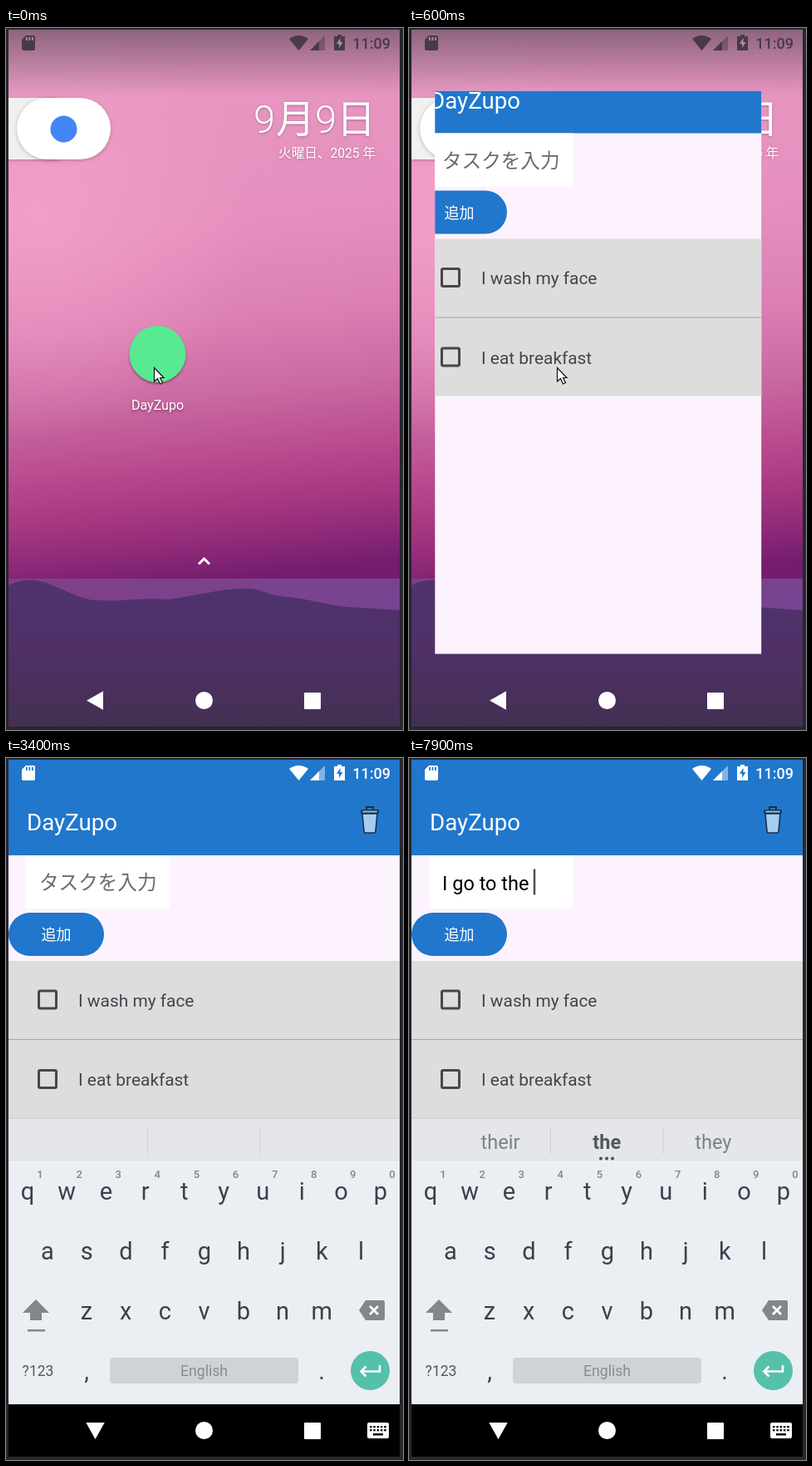
An HTML page with a canvas for the animation above (8 s loop, 478 by 844 pixels).

```html
<!DOCTYPE html>
<html lang="ja">
<meta charset="utf-8">
<style>
html, body { margin: 0; width: 478px; height: 844px; overflow: hidden; background: #28272e }
canvas { display: block }
</style>
<canvas id="stage" width="478" height="844"></canvas>
<script>
const c = document.getElementById('stage').getContext('2d');
const LOOP = 8000, APP = 'DayZupo';
const SANS = 'Roboto, "Noto Sans CJK JP", "Noto Sans CJK", sans-serif';
const BLUE = '#2177cc', WHITE = '#fff';

// time, text, suggestions, blink origin
const typing = [
  [0, '', [], 800],
  [4700, 'I', [], 4200],
  [5200, 'I ', []],
  [5600, 'I g', ['get', 'g', 'go']],
  [5900, 'I go', ['good', 'go', 'got']],
  [6100, 'I go ', ['good', 'go', 'got']],
  [6400, 'I go t', ['the', 't', 'to']],
  [6500, 'I go to', ['go', 'to', 'two']],
  [6700, 'I go to ', ['go', 'to', 'two']],
  [7100, 'I go to t', ['the', 't', 'to']],
  [7300, 'I go to th', ['this', 'th', 'the']],
  [7500, 'I go to the', ['their', 'the', 'they']],
  [7700, 'I go to the ', ['their', 'the', 'they']]
];

const clamp = v => Math.max(0, Math.min(1, v));
const mix = (a, b, p) => a + (b - a) * p;

function box(x, y, w, h, fill, r = 0) {
  c.fillStyle = fill;
  c.beginPath();
  c.roundRect(x, y, w, h, r);
  c.fill();
}
function disc(x, y, r, fill) {
  c.fillStyle = fill;
  c.beginPath();
  c.arc(x, y, r, 0, 7);
  c.fill();
}
function shape(path, fill, stroke, width = 1) {
  const p = new Path2D(path);
  if (fill) { c.fillStyle = fill; c.fill(p); }
  if (stroke) { c.strokeStyle = stroke; c.lineWidth = width; c.stroke(p); }
}
function text(s, x, y, size, fill, align = 'left', weight = 400) {
  c.font = `${weight} ${size}px ${SANS}`;
  c.textAlign = align;
  c.fillStyle = fill;
  c.fillText(s, x, y);
}
function gradient(x0, y0, x1, y1, ...stops) {
  const g = c.createLinearGradient(x0, y0, x1, y1);
  stops.forEach(([p, color]) => g.addColorStop(p, color));
  return g;
}
function shadow(blur, y, color = 'rgba(0,0,0,.35)') {
  c.shadowBlur = blur;
  c.shadowOffsetY = y;
  c.shadowColor = color;
}
const noShadow = () => shadow(0, 0, 'transparent');

function statusBar(dark) {
  const ink = dark ? '#493a47' : WHITE;
  const hole = dark ? '#b58aa5' : BLUE;
  shape('M24 9H33Q35 9 35 11V25Q35 27 33 27H21Q19 27 19 25V14Z', ink);
  for (const x of [24, 27.5, 31]) box(x, 11, 1.8, 4, hole);
  shape('M341 13Q352.500 5 364 13L352.500 27Z', ink);
  c.globalAlpha *= .45;
  shape('M384 9V27H366Z', ink);
  c.globalAlpha /= .45;
  shape('M377 16V27H366Z', ink);
  shape('M399 8H404V10H408V27H395V10H399Z', ink);
  shape('M402.500 12L398 19H401V24L405.500 17H402.500Z', hole);
  text('11:09', 463, 25, 18, ink, 'right', 500);
}

function navButtons(back) {
  shape(back ? 'M99 808.500L116 799V818Z' : 'M98 800H117L107.500 817Z', WHITE, WHITE, 2);
  disc(238.5, 808.5, 10.5, WHITE);
  box(359, 799, 20, 20, WHITE, 1);
}

function home() {
  box(3, 2, 471, 660, gradient(190, 0, 260, 662,
    [0, '#dd96ba'], [.12, '#e796c1'], [.36, '#e68fbe'], [.53, '#dc80b3'],
    [.66, '#cb6ba3'], [.77, '#bb4f91'], [.86, '#a93a82'], [.93, '#922b79'], [1, '#741d6f']));
  const glow = c.createRadialGradient(40, 230, 10, 40, 230, 260);
  glow.addColorStop(0, 'rgba(247,165,205,.65)');
  glow.addColorStop(1, 'rgba(247,165,205,0)');
  box(3, 2, 471, 560, glow);
  box(3, 2, 471, 80, gradient(0, 2, 0, 82, [0, 'rgba(60,50,65,.5)'], [1, 'rgba(60,50,65,0)']));
  box(3, 662, 471, 178, gradient(3, 0, 474, 0, [0, '#804087'], [1, '#774491']));
  shape('M3 670Q22 660 45 666C70 674 90 688 110 688C140 690 155 685 195 687C235 682 255 674 290 674' +
    'C310 674 315 683 340 684C370 687 390 696 430 697L474 700V840H3Z',
    gradient(0, 664, 0, 840, [0, '#50336e'], [.5, '#4e3066'], [1, '#443052']));

  shadow(4, 1, 'rgba(0,0,0,.25)');
  box(3, 84, 60, 74, '#f0f0f1');
  box(13, 84, 113, 74, WHITE, 37);
  noShadow();
  disc(69.5, 121.5, 16, '#4285f4');

  shadow(3, 1, 'rgba(0,0,0,.25)');
  text('9', 298, 126, 47, WHITE, 'left', 300);
  text('月', 325, 126, 47, WHITE);
  text('9', 372, 126, 47, WHITE, 'left', 300);
  text('日', 398, 126, 47, WHITE);
  text('火曜日、2025 年', 445, 156, 15.6, WHITE, 'right');
  shadow(3, 2);
  disc(182.5, 392, 34, '#57ea92');
  text(APP, 182.5, 459, 16, WHITE, 'center');
  noShadow();
  shape('M232 644.500L238.500 638L245 644.500', null, WHITE, 3);
  navButtons(true);
}

function trash() {
  const line = '#17304d';
  shape('M429 67L431 88Q431 90 433 90H443Q445 90 445 88L447 67Z', '#a5cdf0', line, 1.6);
  shape('M434 62V59H442V62', null, line, 2);
  box(427, 62, 22, 5, line, 2);
  box(429, 63.5, 18, 2, '#8dbbe4', 1);
}

function app(t, state) {
  const [start, typed, , origin = start] = state;
  box(3, 0, 471, 840, '#fdf3ff');
  box(3, 0, 471, 117, BLUE);
  text(APP, 25, 87, 27.7, WHITE);
  trash();
  box(24, 117, 173, 64, WHITE);
  if (typed) text(typed, 40, 159, 23.5, '#000');
  else text('タスクを入力', 40, 158, 23.6, '#6b6b6b');
  if ((t - origin + LOOP) % 1000 < 500) {
    c.font = `23.5px ${SANS}`;
    box(39.5 + c.measureText(typed).width, 133.5, 2.5, 31, '#55495a');
  }
  box(3, 186, 115, 52, BLUE, 26);
  text('追加', 60.5, 219, 18, WHITE, 'center');

  box(3, 244, 471, 189, '#dddddd');
  box(3, 338, 471, 1, '#a5a5a5');
  ['I wash my face', 'I eat breakfast'].forEach((item, i) => {
    const y = i * 95.5;
    c.strokeStyle = '#49454f';
    c.lineWidth = 3;
    c.beginPath();
    c.roundRect(39.5, 280 + y, 21, 21, 1.5);
    c.stroke();
    text(item, 87, 298.5 + y, 20.9, '#47434d');
  });
  c.globalAlpha *= 1 - clamp((t - 2000) / 250);
  box(469, 244, 5, 126, '#959595');
  c.globalAlpha = 1;
  box(3, 777, 471, 63, '#000');
}

function keyRow(letters, x, y) {
  [...letters].forEach((k, i) => text(k, x + i * 47.2, y, 29, '#37434b', 'center'));
}

function keyboard(words) {
  const grey = '#7f888c';
  box(3, 432, 471, 2, '#d2d3d7');
  box(3, 434, 471, 51, '#e4e6ea');
  box(3, 485, 471, 292, '#ebeef2');
  box(3, 485, 471, 1, '#f5f7f9');
  for (const x of [170, 305.5]) box(x, 444, 1, 32, '#cdd0d4');
  words.forEach((w, i) => {
    const mid = i === 1;
    text(w, 110 + i * 128.2, 469.5, 23.5, mid ? '#50585e' : '#7b8287', 'center', mid ? 700 : 400);
    if (mid) for (const dx of [-7, 0, 7]) disc(238 + dx, 481.5, 2, '#454d53');
  });
  keyRow('qwertyuiop', 26, 531);
  [...'1234567890'].forEach((n, i) => text(n, 41 + i * 47.1, 505, 13, '#7d868b', 'center', 500));
  keyRow('asdfghjkl', 50, 603);
  keyRow('zxcvbnm', 97, 675);
  shape('M36 651L52 667H43V676H29V667H20Z', grey);
  box(26, 687, 21, 2.5, grey);
  shape('M433 652H454Q456 652 456 654V674Q456 676 454 676H433L425 664Z', grey);
  shape('M438 659L448 669M448 659L438 669', null, WHITE, 2.8);
  text('?123', 38.5, 743, 17.5, '#4f5a61', 'center');
  text(',', 97, 747, 29, '#37434b', 'center');
  text('.', 380, 747, 29, '#37434b', 'center');
  box(125, 721, 227, 31, '#cfd3d8', 4);
  text('English', 238.5, 742.5, 17.7, '#868d92', 'center');
  disc(438.5, 736.5, 23.5, '#55c1ab');
  shape('M450 730V737.500H428M433.500 731.500L427.500 737.500L433.500 743.500', null, WHITE, 2.6);
}

function keyboardIcon() {
  box(435, 799, 26, 19, WHITE, 2);
  for (let i = 0; i < 10; i++) box(438 + i % 5 * 4.3, 803 + (i > 4) * 4, 2.5, 2.3, '#000');
  box(442, 812, 12, 2.5, '#000');
}

function draw(t) {
  const state = typing.findLast(s => s[0] <= t);
  const open = clamp((t - 400) / 336);
  box(0, 0, 478, 844, '#28272e');
  c.save();
  c.beginPath();
  c.rect(3, 2, 471, 838);
  c.clip();
  if (open < 1) home();
  if (open > 0) {
    // the window widens quickly from the icon, then grows in height
    const wide = 1 - (1 - open) ** 1.8;
    const rise = open ** 3.3, tall = rise / (rise + (1 - open) ** 3.3);
    const left = mix(149, 3, wide), top = mix(358, 0, tall);
    c.save();
    c.beginPath();
    c.rect(left, top, mix(217, 474, wide) - left, mix(427, 840, tall) - top);
    c.clip();
    c.globalAlpha = clamp(open * 2.85);
    c.translate(0, 45 * (1 - tall));
    app(t, state);
    c.restore();
  }
  if (open === 1) {
    const p = clamp((t - 750) / 200);
    if (p > 0) {
      c.save();
      c.globalAlpha = clamp(.3 + 1.2 * p);
      c.translate(0, 70 * (1 - p));
      keyboard(state[2]);
      c.restore();
      keyboardIcon();
    }
    navButtons(false);
  }
  statusBar(open < 1);
  if (t < 1000) shape('M178.500 408.500V425L182.500 421.500L185.500 428L188.500 426.500L185.500 420.500H190Z', WHITE, '#111', 1.2);
  c.restore();
}

function frame(now) {
  draw(now % LOOP);
  requestAnimationFrame(frame);
}
requestAnimationFrame(frame);
</script>
</html>
```
